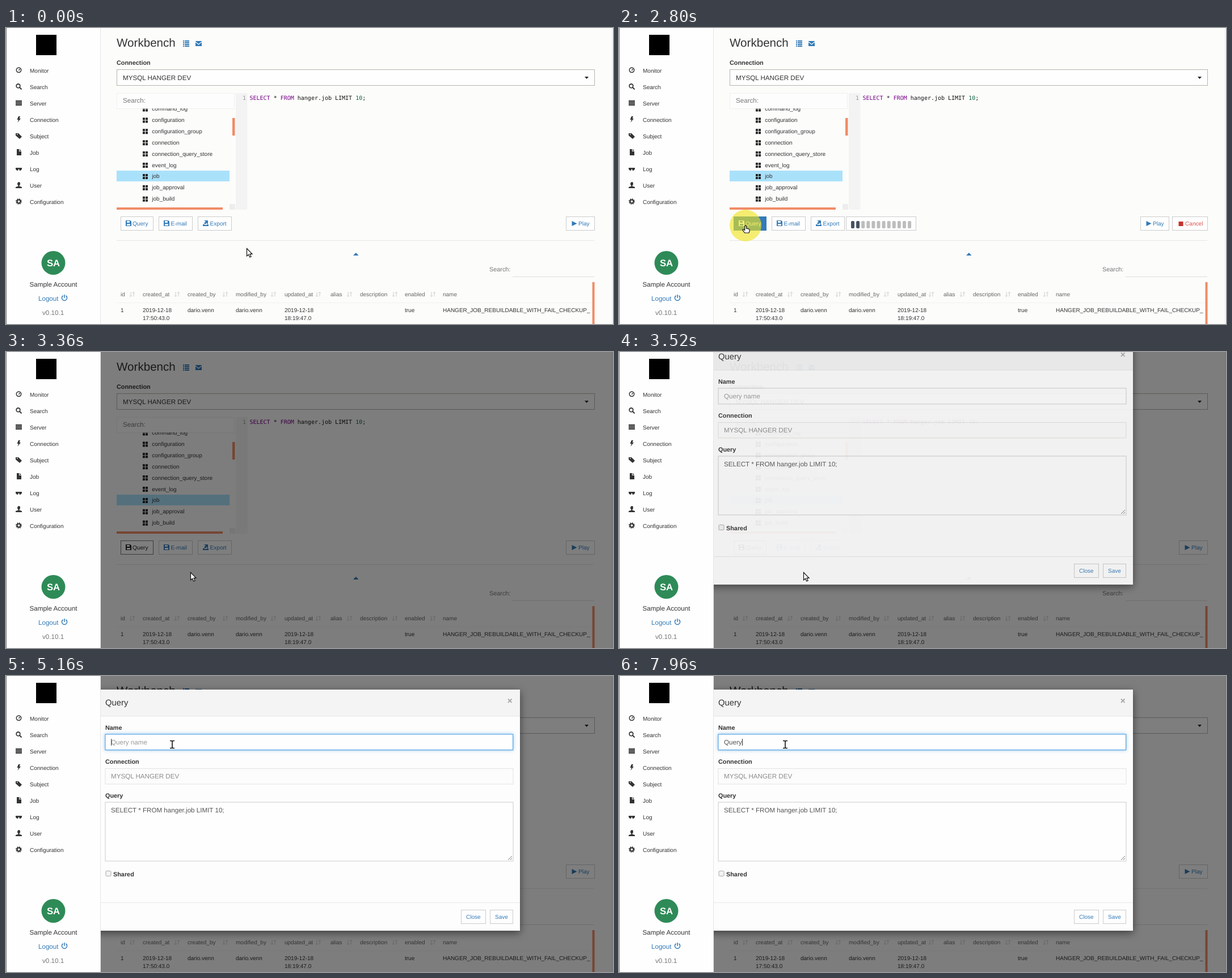
An HTML page that plays this animation: 1070x523 px, repeating every 8000 ms.

```html
<!DOCTYPE html>
<html lang="en">
<head>
<meta charset="utf-8">
<title>Workbench</title>
<style>
  html, body { margin: 0; width: 100%; height: 100%; overflow: hidden; background: #fcfcfb; }
  svg { display: block; width: 100vw; height: 100vh; font-family: "Liberation Sans", Arial, sans-serif; text-rendering: geometricPrecision; }
  text { white-space: pre; }
  .code { font-family: "DejaVu Sans Mono", monospace; }
  .panel { filter: drop-shadow(0 4px 7px rgba(0,0,0,.5)); }
  .glow { filter: drop-shadow(0 0 3px rgba(102,175,233,.7)); }
</style>
</head>
<body>
<svg id="stage" viewBox="0 0 1070 523" preserveAspectRatio="none"></svg>
<script>
const BLUE = '#337ab7', INK = '#333', MUTED = '#777', ORANGE = '#f08c66';
const MD = 11.62, LABEL = 10.85;

const text = (x, y, str, size = 10, fill = INK, attrs = '') =>
  `<text x="${x}" y="${y}" font-size="${size}" fill="${fill}" ${attrs}>${str}</text>`;
const bold = (x, y, str) => text(x, y, str, LABEL, INK, 'font-weight="bold"');
const rect = (x, y, w, h, fill, attrs = '') =>
  `<rect x="${x}" y="${y}" width="${w}" height="${h}" fill="${fill}" ${attrs}/>`;
const box = (x, y, w, h, stroke = '#ccc', fill = '#fefefe', attrs = '') =>
  rect(x + .5, y + .5, w, h, fill, `stroke="${stroke}" ${attrs}`);
const path = (d, fill = INK, attrs = '') => `<path d="${d}" fill="${fill}" ${attrs}/>`;
const group = (id, body, attrs = '') => `<g id="${id}" ${attrs}>${body}</g>`;
const at = (x, y, body) => `<g transform="translate(${x} ${y})">${body}</g>`;
const line = (d, color = INK, width = 1.5) => path(d, 'none', `stroke="${color}" stroke-width="${width}"`);

// Icons live in a box of about 11 by 11.
const floppy = path('M0 0H8L10 2V10H0ZM2 1V4H7V1ZM2 6V9H8V6Z', 'currentColor', 'fill-rule="evenodd"');
const exportIcon = path('M0 7H3V8H7V7H10V10H0ZM2 0H9V6H7V4L4 7L2 5L5 2Z', 'currentColor');
const triangle = path('M0 0L9 4.5L0 9Z', BLUE);
const grid = path('M0 0H4V4H0ZM5 0H9V4H5ZM0 5H4V9H0ZM5 5H9V9H5Z', '#222');
const sortIcon = line('M2 0V8M0 6L2 8L4 6M7 8V0M5 2L7 0L9 2', '#ccc', 1);

const menu = [
  ['Monitor', line('M5.5 1a4.3 4.3 0 1 0 .01 0ZM5.5 6L7.5 3.5')],
  ['Search', line('M4.5 1a3.4 3.4 0 1 0 .01 0ZM7 7L10.5 10.5', INK, 1.8)],
  ['Server', path('M0 1H11V3.5H0ZM0 4.3H11V6.8H0ZM0 7.6H11V10H0Z')],
  ['Connection', path('M5 0H8L6.5 3.8H9L3.5 11L5 6H2.5Z')],
  ['Subject', path('M0 1H5L11 7L7 11L0 5ZM2 2.2V3.8H3.6V2.2Z', INK, 'fill-rule="evenodd"')],
  ['Job', path('M2 0H6V4H10V11H2ZM7 0L10 3H7Z')],
  ['Log', path('M0 4H11V6Q10 9 8 9T6 6H5Q5 9 3 9T0 6Z')],
  ['User', path('M5.5 0Q8 0 8 3T6.5 6.5V7.5L11 9V11H0V9L4.5 7.5V6.5Q3 5 3 3T5.5 0')],
  ['Configuration', '<circle cx="5.5" cy="5.5" r="3" fill="none" stroke="#333" stroke-width="2.2"/>' +
    '<circle cx="5.5" cy="5.5" r="4.6" fill="none" stroke="#333" stroke-width="1.6" stroke-dasharray="1.8 1.8"/>']
];
const tables = ['command_log', 'configuration', 'configuration_group', 'connection',
  'connection_query_store', 'event_log', 'job', 'job_approval', 'job_build'];
const columns = [['id', 202, 218], ['created_at', 241, 297], ['created_by', 320, 382], ['modified_by', 405, 467],
  ['updated_at', 491, 546], ['alias', 572, 601], ['description', 624, 681], ['enabled', 703, 748], ['name', 770]];
const cells = [[202, '1'], [241, '2019-12-18', '17:50:43.0'], [320, 'dario.venn'], [405, 'dario.venn'],
  [491, '2019-12-18', '18:19:47.0'], [703, 'true'], [770, 'HANGER_JOB_REBUILDABLE_WITH_FAIL_CHECKUP_']];

const iconButton = (x, w, icon, label) => box(x, 333, w, 24) +
  `<g color="${BLUE}">${at(x + 9, 340, icon)}</g>` + text(x + 21.5, 349, label, 10.1, BLUE);

const header = text(195, 33, 'Workbench', 20.6) +
  path('M312 22H314V24H312ZM315 22H323V24H315ZM312 25H314V27H312ZM315 25H323V27H315ZM312 28H314V30H312ZM315 28H323V30H315ZM312 31H314V33H312ZM315 31H323V33H315Z', BLUE) +
  rect(334, 23, 11, 9, BLUE) + line('M334 24.5L339.5 29L345 24.5', '#fff', 1.2) +
  bold(195, 65, 'Connection') + box(195, 73, 842, 28, '#b5b5ae') +
  text(206, 92, 'MYSQL HANGER DEV', MD) + path('M1020 86H1027L1023.5 90Z', '#222');

const tree = box(195, 115, 207, 27, '#f0f0ee', '#fdfdfd') + text(206, 132, 'Search:', MD, MUTED) +
  rect(195, 252, 199, 19, '#aae1fa') +
  '<clipPath id="treeClip"><rect x="195" y="142" width="209" height="172"/></clipPath><g clip-path="url(#treeClip)">' +
  tables.map((name, i) => at(241, 138.5 + i * 19.9, grid) + text(257.3, 146 + i * 19.9, name)).join('') + '</g>' +
  rect(399, 159, 4.5, 31, ORANGE) + rect(195, 317, 187, 4, ORANGE) + rect(394, 311, 10, 10, '#ededed');

const editor = rect(405, 115, 20.5, 206, '#f3f3f3') + text(417, 127, '1', 10, '#999', 'class="code"') +
  text(429.5, 127, '<tspan fill="#708">SELECT</tspan> * <tspan fill="#708">FROM</tspan> hanger.job LIMIT <tspan fill="#164">10</tspan>;', 10, '#111', 'class="code"');

const toolbar = group('queryButton',
    rect(202.5, 333.5, 57, 24, 'var(--face)', 'stroke="var(--edge)"') +
    at(211, 340, floppy) + text(223, 349, 'Query', 10.1, 'currentColor')) +
  iconButton(269, 59, floppy, 'E-mail') + iconButton(338, 59, exportIcon, 'Export') +
  group('play', box(987, 333, 50, 24) + at(997.5, 341, triangle) + text(1009, 349, 'Play', 10.1, BLUE)) +
  group('busy', box(400, 333, 123, 24) +
    Array.from({ length: 12 }, (_, i) => rect(409 + i * 9.1, 341, 6, 13, '#bbb', 'class="bar" rx="2"')).join('') +
    box(975, 333, 62, 24) + rect(986.5, 342, 8, 8, '#c9302c') + text(998, 349, 'Cancel', 10.1, '#d9534f'));

const results = rect(195, 375, 842, 1, '#e6e6e6') + path('M612 402H621.5L616.8 397Z', BLUE) +
  text(852, 430, 'Search:', LABEL, MUTED) + rect(893, 439, 144, 1, '#ddd') +
  columns.map(([name, x, sortX]) => text(x, 474, name, 10, '#666') + (sortX ? at(sortX, 466.5, sortIcon) : '')).join('') +
  rect(195, 485, 838, 1, '#f1f1f1') +
  cells.map(([x, ...rows]) => rows.map((row, i) => text(x, 502 + i * 14, row)).join('')).join('') +
  rect(1033.5, 449, 4, 74, ORANGE);

const sidebar = rect(0, 0, 166, 523, '#fefefe') + rect(166, 0, 1, 523, '#e6e6e6') + rect(0, 0, 1, 523, '#777') +
  rect(53, 12, 36, 36, '#000') +
  menu.map(([name, icon], i) => at(17, 69 + i * 29, icon) + text(42, 79 + i * 29, name)).join('') +
  '<circle cx="83.5" cy="415" r="21" fill="#2e8b57"/>' +
  text(83.5, 421, 'SA', 16.7, '#fff', 'font-weight="bold" text-anchor="middle"') +
  text(83.5, 456.5, 'Sample Account', MD, INK, 'text-anchor="middle"') +
  text(57, 481.5, 'Logout', MD, BLUE) + line('M100.5 473A4.6 4.6 0 1 0 105.5 473M103 471V477', BLUE) +
  text(64, 506.5, 'v0.10.1', MD, MUTED);

const dialog = rect(150, 24, 756, 426, '#fdfdfd', 'class="panel"') + rect(150, 24, 756, 47, '#f4f4f4') +
  rect(150, 70.5, 756, 1, '#e6e6e6') + text(175, 52, 'Query', 14.8) +
  line('M885 40.5L891.5 47M891.5 40.5L885 47', '#aaa', 1.8) +
  bold(175, 95, 'Name') + box(174.5, 102.5, 719, 28) +
  rect(175, 103, 718.5, 27.5, '#fefefe', 'id="focus" class="glow" stroke="#66afe9" stroke-width="1.2"') +
  text(185, 121, 'Query name', MD, '#999', 'id="placeholder"') + text(185, 121, '', MD, '#555', 'id="typed"') +
  rect(0, 111, 1, 12, '#222', 'id="caret"') +
  bold(175, 155, 'Connection') + box(174.5, 163, 719, 27.5, '#e2e2df', '#fcfcfc') + text(185, 181, 'MYSQL HANGER DEV', MD, '#8c8c8c') +
  bold(175, 215, 'Query') + box(174.5, 222.5, 719, 104) + text(185, 241, 'SELECT * FROM hanger.job LIMIT 10;', MD, '#555') +
  line('M885 325L892 318M889 325L892 322', '#777', 1) +
  box(175.5, 344, 9, 9, '#aaa', '#f3f3f3', 'rx="1.5"') + bold(189, 354, 'Shared') +
  rect(150, 400, 756, 1, '#e8e8e8') +
  box(802, 413, 43, 24) + text(811, 429, 'Close', 10, BLUE) + box(853, 413, 40, 24) + text(862, 429, 'Save', 10, BLUE);

const pointer = '<circle id="click" r="28" fill="#f0e61e" opacity=".62"/>' +
  path('M.5 .5V14L3.6 11.2L5.7 16L8.1 15L6 10.4H10Z', '#fff', 'id="arrow" stroke="#111" stroke-width="1.2"') +
  path('M-1.3 1Q0-.8 1.5 1V5L6 6.2Q7.5 6.7 7.2 9L6 13H-1.5L-5 8Q-5 6-3 7L-1.3 8.3Z', '#fff', 'id="hand" stroke="#111" stroke-width="1.2"') +
  group('beam', line('M-3-6.5H3M0-6.5V6.5M-3 6.5H3', '#fff', 3.5) + line('M-4-6.5H-1L0-5.5L1-6.5H4M0-6V6M-4 6.5H-1L0 5.5L1 6.5H4', '#111', 1.6));

const stage = document.getElementById('stage');
stage.innerHTML = rect(0, 0, 1070, 523, '#fcfcfb') + rect(1068, 0, 1, 523, '#ececec') +
  header + tree + editor + toolbar + results +
  rect(166, 0, 904, 523, '#000', 'id="backdrop"') + group('dialog', dialog) + sidebar + group('pointer', pointer);

const $ = id => document.getElementById(id);
const bars = [...document.querySelectorAll('.bar')];
const clamp = v => Math.max(0, Math.min(1, v));
const show = (id, visible) => $(id).setAttribute('visibility', visible ? 'inherit' : 'hidden');
const fade = (id, value) => $(id).setAttribute('opacity', value);
const move = (id, x, y) => $(id).setAttribute('transform', `translate(${x} ${y})`);

const LOOP = 8000, PRESS = 2640, FOCUS = 4920;
const keyTimes = [6640, 6880, 7120, 7360, 7560];
const route = [[0, 424, 389], [1000, 424, 389], [2200, 223, 349], [2880, 223, 349], [3280, 325, 389],
  [3600, 325, 389], [3840, 337, 364], [4060, 337, 364], [4760, 293, 121], [LOOP, 293, 121]];

function pointerAt(t) {
  const i = route.findIndex(stop => stop[0] > t);
  const [t0, x0, y0] = route[i - 1], [t1, x1, y1] = route[i];
  const p = (t - t0) / (t1 - t0), eased = p * p * (3 - 2 * p);
  return [x0 + (x1 - x0) * eased, y0 + (y1 - y0) * eased];
}

function draw(t) {
  const [x, y] = pointerAt(t);
  const overButton = t < 3200 && x < 260 && x > 202 && y > 333 && y < 358;
  const overField = t > 3700 && ((y > 103 && y < 131) || (y > 223 && y < 327));
  move('pointer', x, y);
  show('hand', overButton);
  show('beam', overField);
  show('arrow', !overButton && !overField);
  show('click', (t >= 2600 && t < 2900) || (t >= 4880 && t < 5080));

  const pressed = t >= PRESS, style = $('queryButton').style;
  style.setProperty('--face', overButton ? BLUE : '#fefefe');
  style.setProperty('--edge', overButton ? BLUE : pressed ? '#777' : '#ccc');
  style.color = overButton ? '#fff' : pressed ? '#222' : BLUE;

  const busy = pressed && t < 3160;
  show('busy', busy);
  move('play', busy ? -68 : 0, 0);
  const lit = 1 + Math.floor((t - PRESS) / 100);
  bars.forEach((bar, i) => bar.setAttribute('fill', i < lit ? '#465160' : '#bdbdbd'));

  fade('backdrop', .5 * clamp((t - 3210) / 150));
  fade('dialog', clamp((t - 3385) / 150));
  move('dialog', 0, -109 * (1 - clamp((t - 3385) / 300)) ** 1.7);
  show('dialog', t > 3385);

  const count = keyTimes.filter(k => k <= t).length;
  const lastInput = count ? keyTimes[count - 1] : FOCUS;
  fade('focus', clamp((t - FOCUS) / 150));
  $('typed').textContent = 'Query'.slice(0, count);
  show('placeholder', !count);
  $('caret').setAttribute('x', 185.3 + (count ? $('typed').getComputedTextLength() : 0));
  fade('caret', t >= FOCUS && (t - lastInput) % 1000 < 500 ? 1 : 0);
}

const start = performance.now();
function tick() {
  draw((performance.now() - start) % LOOP);
  requestAnimationFrame(tick);
}
tick();
</script>
</body>
</html>
```
